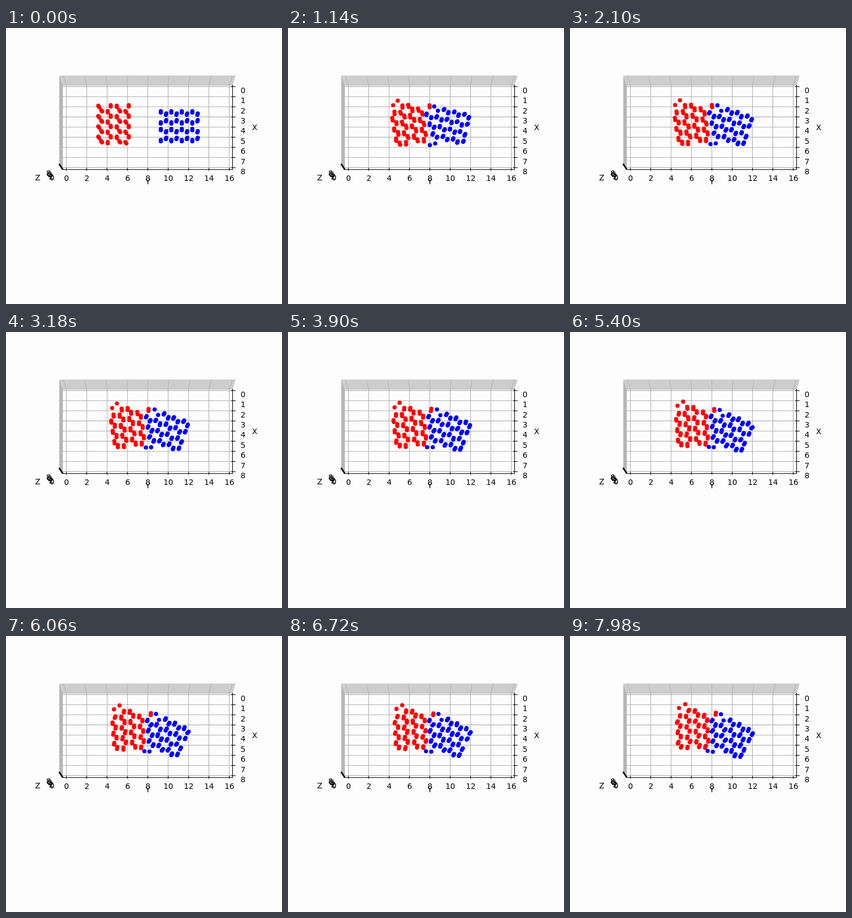
An HTML page that plays this animation: 500 px wide and 500 px high, repeating every 8.04 s.

```html
<!DOCTYPE html>
<html>
<head>
<meta charset="utf-8">
<style>
html, body { margin: 0; width: 100%; height: 100%; overflow: hidden; background: #fdfdfd; }
svg { display: block; width: 500px; height: 500px; }
text { font: 13.9px "DejaVu Sans", sans-serif; text-anchor: middle; }
</style>
</head>
<body>
<svg id="stage" viewBox="0 0 500 500"></svg>
<script>
const LOOP = 8040, STEP = 60;
const HIT = 840, MERGED = 1140, LAST = LOOP - STEP;
const stage = document.getElementById('stage');
const clamp = v => Math.min(1, Math.max(0, v));
const mix = (a, b, k) => a + (b - a) * k;

// ---- axes ----
const line = (x1, y1, x2, y2, color = '#b0b0b0', w = 1.1) =>
  `<line x1="${x1}" y1="${y1}" x2="${x2}" y2="${y2}" stroke="${color}" stroke-width="${w}"/>`;
const label = (s, x, y) => `<text x="${x}" y="${Math.round(y) + 5}">${s}</text>`;

function axes() {
  let grid = '', ticks = '', labels = '';
  for (let i = 0; i <= 8; i++) {
    const k = i / 8, x = 109.4 + 36.88 * i, y = 106.1 + 18.35 * i;
    grid += line(96.5 + 6.2 * k, 86.8 + 16 * k, 416 - 5 * k, 86.8 + 16 * k, '#c2c2c2', .9);
    grid += line(257 + (x - 257) * 1.04, 86.5, x, 103) + line(x, 103, x, 256);
    grid += line(103, y, 410.5, y);
    ticks += line(x, 253.5, x, 258.5, '#000') + line(408, y, 416, y, '#000');
    labels += label(2 * i, x + .3, 272) + label(i, 429.5, 113 + 18.37 * i);
  }
  for (let i = 0; i <= 4; i++) labels += label(2 * i, 83.5 - 1.6 * i, 271 - 2.1 * i);
  return '<path d="M96.5 86.5H416L411 103.5H103Z" fill="#d6d6d6"/>' +
    '<path d="M96.5 86.5L103 103.5V256L96.5 246Z" fill="#b6b6b6"/>' +
    grid + line(103, 103.5, 410.5, 103.5) +
    line(410.5, 103, 410.5, 257, '#000') + line(103, 256.5, 411, 256.5, '#000') +
    line(96, 246, 103, 256.5, '#000', 2.8) + ticks + labels +
    label('X', 450.5, 180) + label('Y', 257, 278) + label('Z', 57.5, 271);
}

// ---- clusters: approach at constant speed, then turn against each other ----
const RED = {
  fill: '#f00', x: 194.5, y: 169.8,
  pose: (t, u) => ({
    x: 194.5 + 22.7 * clamp(t / MERGED) + 4.1 * u,
    y: 169.8 - 6.2 * u,
    turn: -10 + 7.5 * u * u * (3 - 2 * u),
    dx: .7 - 1.5 * u, dy: 4 - u
  })
};
const BLUE = {
  fill: '#00f', x: 313.5, y: 178,
  pose: (t, u, bound) => ({
    x: 313.5 - 23.5 * clamp(t / MERGED),
    y: 178 - 2 * bound + 6 * u,
    turn: 13.5 + 14.2 * u ** .55,
    dx: -1 - .7 * Math.sqrt(u), dy: 2.2 + .8 * Math.sqrt(u)
  })
};

// ---- lattices: 4 rows of 8 pairs each ----
const dots = [];
function addPair(group, x, y, slant, sites = []) {
  for (const half of [0, 1])
    dots.push({ group, x, y, slant, side: half - .5, site: sites[half] || [x, y] });
}

// Pairs at the corners break up on contact and settle on new lattice sites
const RED_SITES = { '00': [[183, 131], [173, 134]], '07': [[238, 149], [238, 149]] };
const BLUE_SITES = { '00': [, [271, 168]], '01': [[271, 168]], '30': [[290, 222], [299, 215]] };

for (let row = 0; row < 4; row++)
  for (let col = 0; col < 8; col++) {
    const x = 168 + 16.35 * (col >> 1) + 5.3 * (col % 2);
    const y = 141 + [1, 9, 10.7, 0][col % 4] + 18.7 * row;
    addPair(RED, x, y, [0, 1, 5, 6].includes(col) ? 1.7 : .1, RED_SITES['' + row + col]);
  }
for (let row = 0; row < 4; row++)
  for (let col = 0; col < 8; col++) {
    const odd = col % 2, low = row % 2;
    const y = 152 + 16 * row + 4 * low + odd * (low ? -4 : 4);
    addPair(BLUE, 280.5 + 9.5 * col, y, -.8 * odd, BLUE_SITES['' + row + col]);
  }

stage.innerHTML = axes() +
  dots.map(d => `<circle r="3.8" fill="${d.group.fill}"/>`).join('');
const circles = stage.querySelectorAll('circle');

function place(d, pose, bound) {
  const a = pose.turn * bound * Math.PI / 180, c = Math.cos(a), s = Math.sin(a);
  const px = mix(d.x, d.site[0], bound) - d.group.x;
  const py = mix(d.y, d.site[1], bound) - d.group.y;
  return [
    pose.x + px * c - py * s + d.side * mix(d.slant, pose.dx, bound),
    pose.y + px * s + py * c + d.side * mix(2.4, pose.dy, bound)
  ];
}

function draw(now) {
  const t = Math.floor(now % LOOP / STEP) * STEP;
  const bound = clamp((t - HIT) / (MERGED - HIT));
  const u = clamp((t - MERGED) / (LAST - MERGED));
  const red = RED.pose(t, u, bound), blue = BLUE.pose(t, u, bound);
  dots.forEach((d, i) => {
    const [x, y] = place(d, d.group === RED ? red : blue, bound);
    // slight thermal shake after contact
    const phase = t / (90 + i % 7 * 12) + i * 2.4, amp = .4 * bound;
    circles[i].setAttribute('cx', (x + amp * Math.sin(phase)).toFixed(2));
    circles[i].setAttribute('cy', (y + amp * Math.cos(phase * 1.1)).toFixed(2));
  });
}

const began = performance.now();
function tick() {
  draw(performance.now() - began);
  requestAnimationFrame(tick);
}
tick();
</script>
</body>
</html>
```
